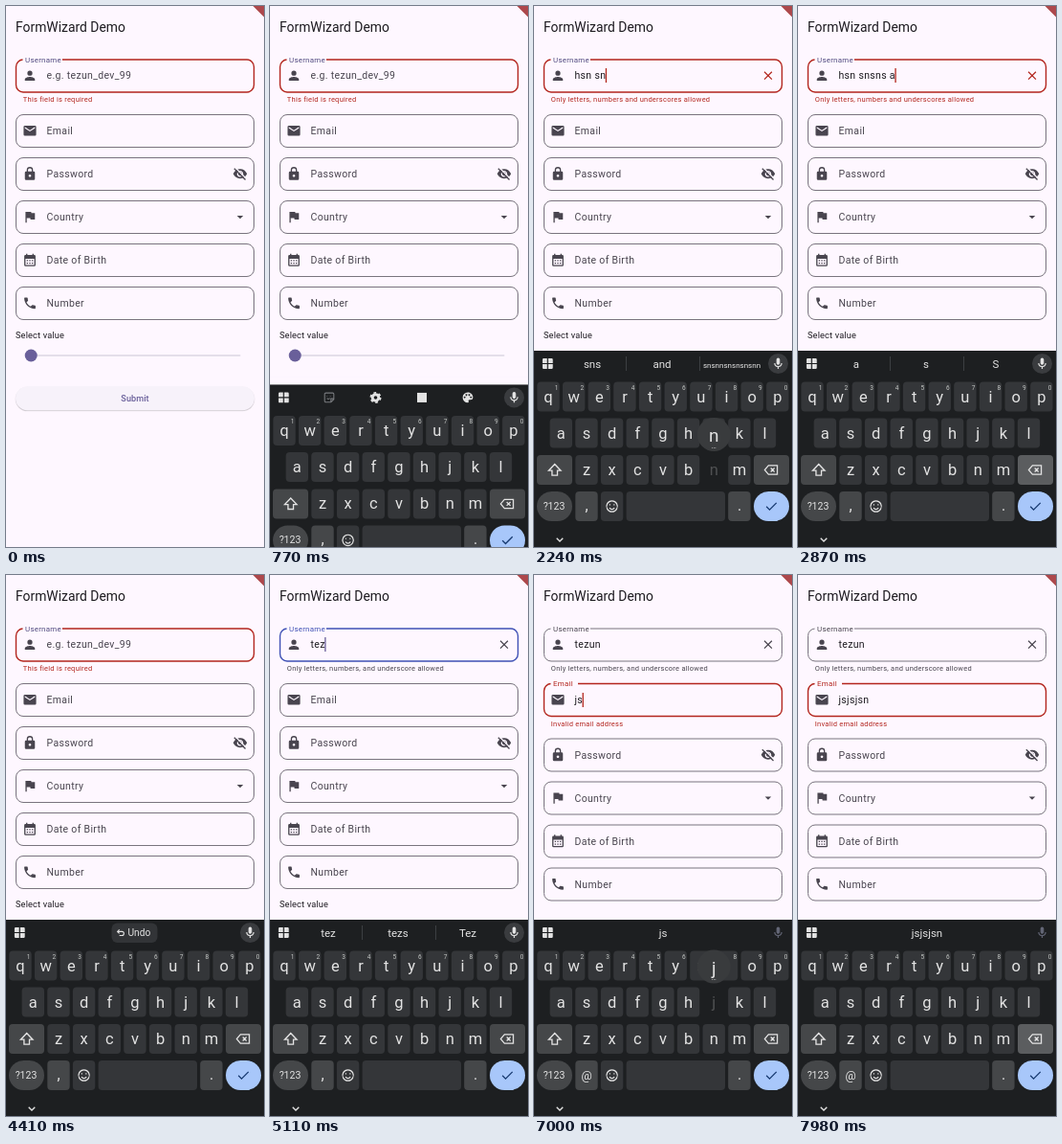
Recreate the animation shown at these times as an HTML page. Size 270x565 px, loop 8 s.

```html
<!DOCTYPE html>
<html lang="en">
<head>
<meta charset="utf-8">
<title>FormWizard Demo</title>
<style>
html, body { margin: 0; width: 100%; height: 100%; overflow: hidden; background: #fef7ff; }
svg { display: block; width: 270px; height: 565px; font-family: Roboto, sans-serif; white-space: pre; }
</style>
</head>
<body>
<svg id="stage" viewBox="0 0 270 565"></svg>
<script>
const LOOP = 8000, MAIL_FOCUS = 6280, BLINK = 500;
const BG = '#fef7ff', INK = '#1d1b20', GREY = '#49454f', LINE = '#79747e';
const RED = '#b3261e', BLUE = '#3f51b5', PURPLE = '#695f9a', KEY_INK = '#e3e3e3';
const NAME = 'tezun';

const ICONS = {
  person: 'M12 12a4 4 0 1 0 0-8 4 4 0 0 0 0 8zm0 2c-2.7 0-8 1.3-8 4v2h16v-2c0-2.7-5.3-4-8-4z',
  mail: 'M4 4h16a2 2 0 0 1 2 2v12a2 2 0 0 1-2 2H4a2 2 0 0 1-2-2V6a2 2 0 0 1 2-2zm0 2v2l8 5 8-5V6l-8 5z',
  lock: 'M7 8V6a5 5 0 0 1 10 0v2h1a2 2 0 0 1 2 2v10a2 2 0 0 1-2 2H6a2 2 0 0 1-2-2V10a2 2 0 0 1 2-2zm2 0h6V6a3 3 0 0 0-6 0zm3 5a2 2 0 1 0 .01 0z',
  flag: 'M14.4 6L14 4H5v17h2v-7h5.6l.4 2h7V6z',
  calendar: 'M3 6a2 2 0 0 1 2-2h1V2h2v2h8V2h2v2h1a2 2 0 0 1 2 2v14a2 2 0 0 1-2 2H5a2 2 0 0 1-2-2zM5 10v10h14V10zM7 12h2v2H7zm4 0h2v2h-2zm4 0h2v2h-2zM7 16h2v2H7zm4 0h2v2h-2zm4 0h2v2h-2z',
  phone: 'M6.6 10.8c1.4 2.8 3.8 5.1 6.6 6.6l2.2-2.2c.3-.3.7-.4 1-.2 1.1.4 2.3.6 3.6.6.5 0 1 .4 1 1V20c0 .6-.5 1-1 1C10.6 21 3 13.4 3 4c0-.6.5-1 1-1h3.5c.6 0 1 .4 1 1 0 1.2.2 2.4.6 3.6.1.3 0 .7-.3 1z',
  eye: 'M1 12C3 7.5 7 4.5 12 4.5S21 7.5 23 12C21 16.5 17 19.5 12 19.5S3 16.5 1 12zM12 7a5 5 0 1 0 .01 0zM12 9a3 3 0 1 1-.01 0z',
  arrow: 'M7 10l5 5 5-5z',
  mic: 'M12 14a3 3 0 0 0 3-3V5a3 3 0 0 0-6 0v6a3 3 0 0 0 3 3zm5-3a5 5 0 0 1-10 0H5a7 7 0 0 0 6 6.9V21h2v-3.1A7 7 0 0 0 19 11z',
  grid: 'M3 5a2 2 0 0 1 2-2h6v8H3zM13 3h6a2 2 0 0 1 2 2v6h-8zM3 13h8v8H5a2 2 0 0 1-2-2zM13 13h8v6a2 2 0 0 1-2 2h-6z',
  palette: 'M12 3a9 9 0 0 0 0 18c1.5 0 2-1.5 1.3-2.5-.6-1 0-2.5 1.7-2.5h2a4 4 0 0 0 4-4c0-5-4-9-9-9zM6.5 10a1.5 1.5 0 1 0 .01 0zM9.5 6a1.5 1.5 0 1 0 .01 0zM14.5 6a1.5 1.5 0 1 0 .01 0zM17.5 10a1.5 1.5 0 1 0 .01 0z'
};
const STROKES = {
  close: 'M6 6L18 18M18 6L6 18',
  slash: 'M2.6 3.6L20.4 21.4',
  shift: 'M12 3.5L3 13h5v7h8v-7h5z',
  back: 'M8 5h14v14H8l-6-7zM11.5 9l6 6M17.5 9l-6 6',
  smile: 'M12 3a9 9 0 1 0 .01 0M8 14.5a4.5 4.5 0 0 0 8 0M8.5 8.5v1.8M15.5 8.5v1.8',
  check: 'M4 12.5l5 5L20 6.5',
  chevron: 'M7 10l5 5 5-5',
  undo: 'M9 5L4.5 9.5 9 14M4.5 9.5H15a4.5 4.5 0 0 1 0 9H9',
  sticker: 'M4 6a2 2 0 0 1 2-2h12a2 2 0 0 1 2 2v9l-5 5H6a2 2 0 0 1-2-2zM20 14h-5v6M8 9v1M14 9v1M8 13q3 3 5 0',
  gear: 'M12 6.5a5.5 5.5 0 1 0 .01 0'
};

// Key strokes as [time, character]; '<' deletes.
const userKeys = [
  [1420, 'h'], [1540, 's'], [1640, 'n'], [1840, ' '], [2000, 's'], [2210, 'n'],
  [2350, 's'], [2420, 'n'], [2480, 's'], [2540, ' '], [2600, 'a'],
  ...[3095, 3285, 3355, 3425, 3495, 3565, 3635, 3775, 3815, 3850, 3900].map(time => [time, '<']),
  ...[...NAME].map((c, i) => [4720 + 170 * i, c])
];
const mailKeys = [...'jsjsjsn'].map((c, i) => [6815 + 110 * i, c]);

const predictions = ['sns', 'and', 'snsnnsnsnsnsnn'];
const suggestionsFor = {
  '': predictions, sn: predictions, a: ['a', 's', 'S'],
  [NAME]: [NAME, NAME + 'malk...ail.com', 'Tezun']
};

const pen = document.createElement('canvas').getContext('2d');
pen.font = '10.5px Roboto, sans-serif';
const fieldWidth = s => pen.measureText(s).width + s.length * 0.33;

const text = (x, y, s, size, fill, more = '') =>
  `<text x="${x}" y="${y}" font-size="${size}" fill="${fill}" ${more}>${s}</text>`;
const mid = (x, y, s, size, fill, more = '') => text(x, y, s, size, fill, 'text-anchor="middle" ' + more);
const rect = (x, y, w, h, r, fill, more = '') =>
  `<rect x="${x}" y="${y}" width="${w}" height="${h}" rx="${r}" fill="${fill}" ${more}/>`;
const circle = (x, y, r, fill) => `<circle cx="${x}" cy="${y}" r="${r}" fill="${fill}"/>`;
const place = (x, y, scale, body) =>
  `<g transform="translate(${x} ${y}) scale(${scale}) translate(-12 -12)">${body}</g>`;
const icon = (name, x, y, fill, scale = 0.657) =>
  place(x, y, scale, `<path d="${ICONS[name]}" fill="${fill}" fill-rule="evenodd"/>`);
const stroke = (name, x, y, color, scale = 0.657, width = 2) =>
  place(x, y, scale, `<path d="${STROKES[name]}" fill="none" stroke="${color}" stroke-width="${width}"/>`);

const typed = (keys, t) => keys.reduce((s, [time, c]) =>
  time > t ? s : c === '<' ? s.slice(0, -1) : s + c, '');

function caretOn(keys, start, t) {
  const since = keys.reduce((last, [time]) => time <= t ? Math.max(last, time) : last, start);
  return Math.floor((t - since) / BLINK) % 2 === 0;
}

const caret = (s, y, fill) => rect(42 + fieldWidth(s), y - 7.5, 1.3, 15, 0, fill);
const note = (y, s, fill) => text(17.8, y, s, 7.5, fill, 'letter-spacing=".24"');
const value = (y, s, fill) => text(42.5, y + 3.5, s, 10.5, fill, 'letter-spacing=".33"');

// Outlined field centred on y; lift moves its label from inside (0) to the border (1).
function field(y, name, label, { border = LINE, width = 1, lift = 0, labelColor = GREY } = {}) {
  const gap = label.length * 4.3 + 7;
  return rect(10.5, y - 17, 249, 34, 7.5, 'none', `stroke="${border}" stroke-width="${width}"`) +
    (lift ? rect(17.5, y - 19, gap * lift, 4, 0, BG) : '') +
    icon(name, 25, y - 0.2, GREY) +
    text(42.5 - 22.5 * lift, y + 3.5 - 17.8 * lift, label, 10.5 - 2.6 * lift, labelColor,
      `letter-spacing="${0.33 - 0.07 * lift}"`);
}

function form(t, user, mail) {
  const onMail = t >= MAIL_FOCUS;
  const bad = /\W/.test(user), error = !user || bad;
  const lift = onMail ? 1 - (1 - Math.min(1, (t - MAIL_FOCUS) / 170)) ** 3 : 0;
  const drop = mail ? 12.5 : 0;
  const mailColor = mail ? RED : BLUE;
  let out = text(10, 27.4, 'FormWizard Demo', 13.9, INK) +
    '<path d="M258.5 0H270V11.5z" fill="#ad484c"/>';

  out += field(73, 'person', 'Username', onMail ? { lift: 1 } : {
    border: error ? RED : BLUE, width: 1.4, lift: 1, labelColor: error ? '#514b80' : BLUE
  });
  out += value(72.7, user || `e.g. ${NAME}_dev_99`, user ? INK : GREY);
  if (user) out += stroke('close', 245, 72.7, error && !onMail ? RED : GREY, 0.657, 1.9);
  out += note(100.4, !user ? 'This field is required'
    : bad ? 'Only letters, numbers and underscores allowed'
    : 'Only letters, numbers, and underscore allowed', error ? RED : GREY);
  if (!onMail && caretOn(userKeys, 260, t)) out += caret(user, 72.5, error ? RED : PURPLE);

  out += field(130.5, 'mail', mail || onMail ? 'Email' : 'Email',
    onMail ? { border: mailColor, width: 1.4, lift, labelColor: mailColor } : {});
  if (mail) out += value(130.3, mail, INK) + note(158, 'Invalid email address', RED);
  if (onMail && caretOn(mailKeys, MAIL_FOCUS, t)) out += caret(mail, 130.5, mail ? RED : PURPLE);

  const rest = field(175.5, 'lock', 'Password') +
    icon('eye', 245, 175.3, GREY) +
    stroke('slash', 246, 174.3, BG) + stroke('slash', 245, 175.3, GREY) +
    field(220.5, 'flag', 'Country') + icon('arrow', 245, 220.3, GREY) +
    field(265.5, 'calendar', 'Date of Birth') +
    field(310.5, 'phone', 'Number') +
    text(10, 347, 'Select value', 9.2, INK, 'letter-spacing=".16"') +
    rect(26, 364.2, 219.5, 1.6, 0.8, '#dcd6e3') + circle(26.2, 365, 6.5, PURPLE) +
    rect(10, 398.3, 250, 25, 12.5, '#000', 'opacity=".10"') +
    rect(9.6, 397.8, 250.8, 25.3, 12.6, '#000', 'opacity=".08"') +
    rect(10, 397.2, 250, 25, 12.5, '#f7f2fa') +
    mid(135, 413, 'Submit', 9.1, PURPLE, 'font-weight="500" letter-spacing=".07"');
  return out + `<g transform="translate(0 ${drop})">${rest}</g>`;
}

const rows = [['qwertyuiop', 15, 408], ['asdfghjkl', 28.3, 446], ['zxcvbnm', 55, 484.5]];
const letters = rows.flatMap(([row, x, y]) => [...row].map((c, i) => ({ c, x: x + 26.65 * i, y })));

function topBar(t, user, mail) {
  const onMail = t >= MAIL_FOCUS;
  let out = icon('grid', 14.3, 373.5, KEY_INK, 0.6);
  if (!onMail) out += circle(255.5, 373.5, 10.5, '#3a3c3f');
  out += icon('mic', 255.5, 373.5, onMail ? '#626575' : KEY_INK, 0.6);
  if (mail) return out + mid(135, 378, mail, 11.5, KEY_INK);
  if (!onMail && user) {
    const word = user.split(' ').pop();
    const words = suggestionsFor[word] || [word, word + 's', word[0].toUpperCase() + word.slice(1)];
    words.forEach((w, i) => out += mid(61 + 73 * i, 377.7, w, w.length > 10 ? 8 : 11.5, KEY_INK));
    return out + rect(96, 366, 1, 15, 0, '#3c3f42') + rect(173, 366, 1, 15, 0, '#3c3f42');
  }
  if (t >= 4370 && t < 4720)
    return out + rect(110.5, 363.5, 48, 20.5, 6, '#323437') +
      stroke('undo', 120, 373.5, KEY_INK, 0.45, 2.4) + text(127.5, 377.2, 'Undo', 10.2, KEY_INK);
  return out + stroke('sticker', 62, 373.5, '#77797d', 0.6, 1.8) +
    stroke('gear', 110.5, 373.5, KEY_INK, 0.6, 5) +
    place(110.5, 373.5, 0.6, `<circle cx="12" cy="12" r="8.5" fill="none" stroke="${KEY_INK}" stroke-width="3" stroke-dasharray="4.45"/>`) +
    rect(154, 368.5, 10, 10, 0, KEY_INK) + icon('palette', 207, 373.5, KEY_INK, 0.6);
}

function keyboard(t, user, mail) {
  const onMail = t >= MAIL_FOCUS;
  const down = new Set([...userKeys, ...mailKeys]
    .filter(([time]) => t >= time - 100 && t < time + 40).map(key => key[1]));
  const holding = (t >= 2850 && t < 4130) || t >= 7750;
  const key = '#343639', side = '#454749';
  let out = rect(0, 352, 270, 8, 0, BG) + rect(0, 360, 270, 206, 0, '#1d1f21') + topBar(t, user, mail);
  let popups = '';
  letters.forEach(({ c, x, y }, i) => {
    const pressed = down.has(c);
    if (!pressed) out += rect(x - 11.7, y - 15.5, 23.4, 31, 4, key);
    out += mid(x, y + 5.5, c, 16.5, KEY_INK, pressed ? 'opacity=".25"' : '');
    if (i < 10) out += mid(x + 8.7, y - 7.5, (i + 1) % 10, 6.5, '#c4c7c5');
    if (pressed) popups += circle(x, y - 37, 17.5, '#393b3d') +
      mid(x, y - 29.5, c, 19, KEY_INK) + mid(x, y - 23, '…', 8, KEY_INK);
  });
  out += rect(3, 469, 37, 31, 4, side) + stroke('shift', 21.7, 484.5, KEY_INK, 0.7, 1.9) +
    rect(230, 469, 37, 31, 4, holding ? '#5b5d5f' : side) + stroke('back', 248, 484.5, KEY_INK, 0.66, 1.9) +
    rect(3, 507, 37, 31, 15.5, side) + mid(21, 526, '?123', 10.5, KEY_INK) +
    rect(43.3, 507, 23.4, 31, 4, side) +
    mid(55, 527, onMail ? '@' : ',', onMail ? 12.5 : 16, KEY_INK) +
    rect(69.9, 507, 23.4, 31, 4, key) + stroke('smile', 81.6, 522.5, KEY_INK, 0.63, 1.9) +
    rect(96.6, 507, 103.4, 31, 4, key) +
    rect(203.2, 507, 23.4, 31, 4, side) + mid(215, 527, '.', 16, KEY_INK) +
    rect(230, 507, 37, 31, 15.5, '#a8c7fa') + stroke('check', 248.5, 522.5, '#173a70', 0.66, 2) +
    stroke('chevron', 27, 557, KEY_INK, 0.66, 2);
  return out + popups;
}

const stage = document.getElementById('stage');
let shown = '';

function draw() {
  const t = performance.now() % LOOP;
  const user = typed(userKeys, t), mail = typed(mailKeys, t);
  const hidden = (1 - Math.min(1, Math.max(0, (t - 600) / 380))) ** 3;
  let scene = form(t, user, mail);
  if (hidden < 1) scene += `<g transform="translate(0 ${213 * hidden})">${keyboard(t, user, mail)}</g>`;
  if (scene !== shown) stage.innerHTML = shown = scene;
  requestAnimationFrame(draw);
}
draw();
</script>
</body>
</html>
```
